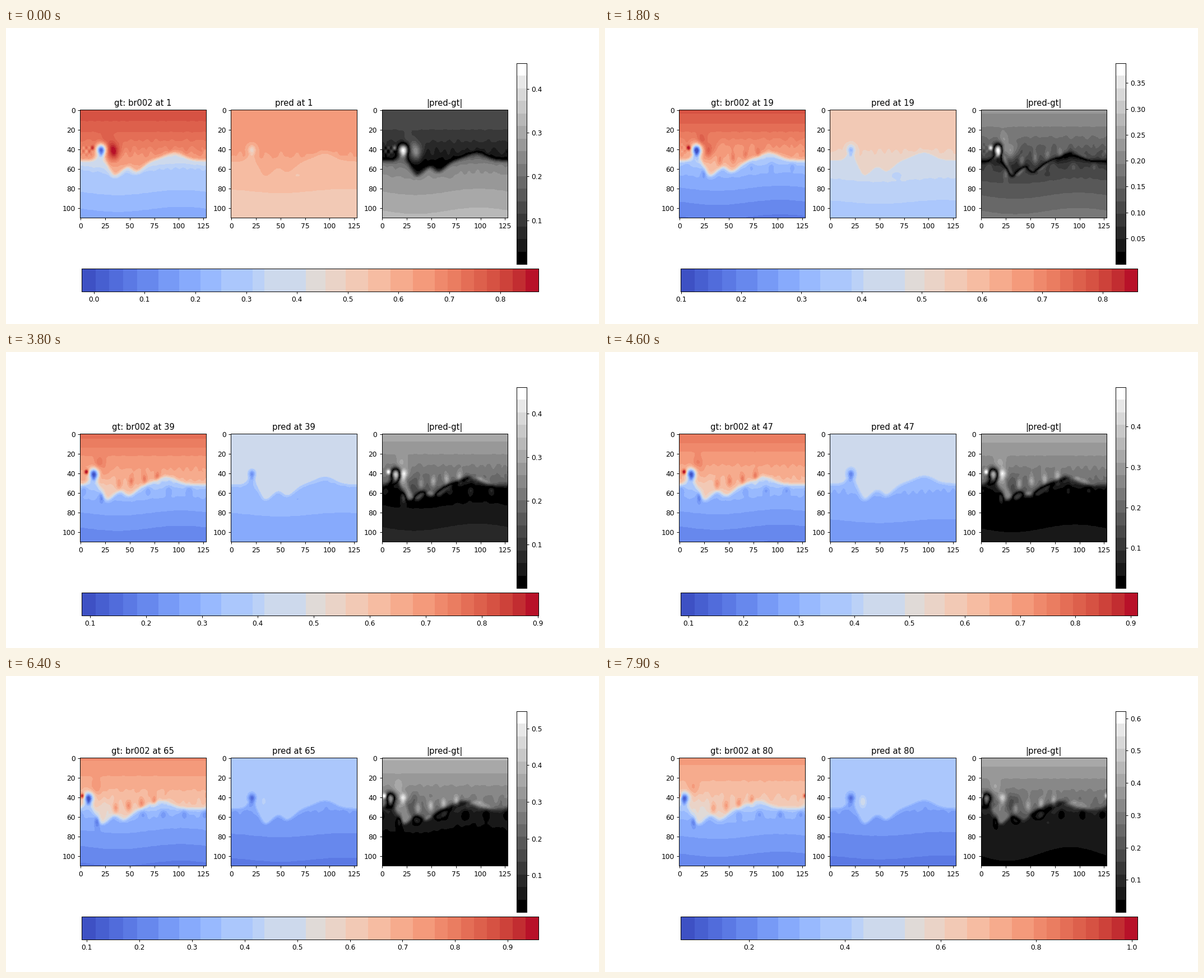
These frames come from a looping animation (1058 px wide and 529 px high, 8 s). A matplotlib script:

```python
import numpy as np
import matplotlib.pyplot as plt
from matplotlib.animation import FuncAnimation
from matplotlib.colors import ListedColormap

W, H, DPI = 1058, 529, 1058 / 12
NX, NY, FRAMES = 128, 110, 80
Y, X = np.mgrid[0:NY, 0:NX].astype(float)
rng = np.random.default_rng(4)

WAVES = [(rng.integers(5, 17), rng.uniform(.08, .3) * (-1) ** i,
          rng.uniform(0, 2 * np.pi)) for i in range(9)]


def gauss(d, s):
    return np.exp(-.5 * (d / s) ** 2)


def wrap(d):
    return (d + NX / 2) % NX - NX / 2


def bump(x, y, sx, sy):
    return gauss(wrap(X - x), sx) * gauss(Y - y, sy)


def ripple(u, n):
    return sum(np.sin(2 * np.pi * k * u / NX + q * Y + p + .02 * i * n)
               for i, (k, q, p) in enumerate(WAVES)) / 3


def front(x):
    """Height of the interface: two troughs, a crest and a small hump."""
    return (51.5 + 15 * gauss(wrap(x - 37), 6.5) + 11 * gauss(wrap(x - 58), 6.5)
            - 8 * gauss(wrap(x - 93), 10) - 8 * gauss(wrap(x - 19), 3.8))


def signed_distance(u):
    s = u + .18 * (Y - 56)
    slope = front(s + .5) - front(s - .5)
    return (Y - front(s)) / np.sqrt(1 + slope ** 2)


def blend(cold, warm, dist, width):
    return cold + (warm - cold) * .5 * (1 - np.tanh(dist / width))


def eddies(n):
    fade, grow = np.exp(-n / 25), 1 - np.exp(-n / 35)
    f = (-.54 - .13 * fade) * bump(21 - .2 * n, 40.5, 3.2, 3.8)
    f += (.15 + .25 * grow) * bump(12.5 - .165 * n, 38.5, 1.5, 1.8)
    f += .19 * fade * bump(33 - .17 * n, 42, 4.5, 6.5)
    f += (.03 + .05 * grow) * bump(25 - .14 * n, 30, 3.5, 5)
    f -= .07 * grow * bump(36 - .17 * n, 51, 8, 9)
    f -= .18 * grow * bump(28 - .17 * n, 64, 1.8, 4.2)
    for i in range(4):
        f += .17 * grow * bump(43 + 13 * i - .11 * n, 51 - 2.5 * i, 2, 4)
        f -= .09 * grow * bump(76 + 21 * i - .2 * n, 57, 2.4, 3.2)
    dots = np.cos(2 * np.pi * (X + .2 * n) / 6) * np.cos(2 * np.pi * (Y - 38) / 8)
    return f + .08 * fade * dots * bump(6 - .17 * n, 41, 5, 3.5)


def truth(n):
    u = X + .2 * n
    env = gauss(Y - 46, 11)
    noise = env * ripple(u, n)
    y = Y + 3 * noise
    early = .787 - .125 * (np.maximum(y, 0) / 48) ** 1.5
    late = .764 - .0029 * y
    warm = late + (early - late) * np.exp(-n / 35)
    y = np.maximum(y - 2.6 * np.cos(2 * np.pi * (X - 38) / NX), 48)
    cold = .32 - .0024 * (y - 55) + .06 * np.exp((50 - y) / 6)
    return blend(cold, warm, signed_distance(u), 2.1) + .02 * noise + eddies(n)


PRED_DIST = signed_distance(X)
PRED_NOISE = ripple(X, 0) * gauss(Y - 50, 11)


def predicted(n):
    late = (n / FRAMES) ** 4
    top = .648 - .0055 * n + .000022 * n * n
    low = .235 + .33 * np.exp(-n / 30)
    bottom = .09 + .425 * np.exp(-n / 43)
    y = Y + 3 * PRED_NOISE
    warm = top + (.04 * late - .02) * np.minimum(y, 50) / 45
    y = np.maximum(y - 2 * np.cos(2 * np.pi * (X - 50) / NX), 50)
    cold = low + (bottom - low) * (y - 55) / 54
    core = -.16 - .08 * (1 - np.exp(-n / 10))
    return (blend(cold, warm, PRED_DIST, 1.5) + core * bump(21, 40.5, 2.6, 3.2)
            + .09 * late * bump(33, 44, 3.6, 6) - .02 * bump(67, 66, 3, 2))


def limits(n):
    """Lowest and highest value of the colours, highest error."""
    keys = [0, 8, 30, 46, 64, 79]
    return (np.interp(n, keys, [-.024, .112, .084, .086, .090, .057]),
            np.interp(n, keys, [.875, .831, .890, .912, .958, 1.011]),
            np.interp(n, keys, [.458, .359, .422, .497, .546, .621]))


def banded(name, edges, stretch=False):
    mids = (edges[1:] + edges[:-1]) / 2
    if stretch:
        mids[0], mids[-1] = 0, 1
    t = (np.arange(1024) + .5) / 1024
    return ListedColormap(plt.get_cmap(name)(mids)[np.searchsorted(edges, t) - 1])


# bands are wide around the middle of the scale and narrow at both ends
HEAT = banded("coolwarm", np.interp(
    np.arange(26), [0, 4, 8, 9, 10, 11, 13, 17, 25],
    [0, .1215, .3055, .374, .399, .491, .578, .773, 1]))
GREY = banded("gray", np.linspace(0, 1, 17), stretch=True)

fig = plt.figure(figsize=(12, 6), dpi=DPI, facecolor="white")


def axes_at(x, y, w, h):
    return fig.add_axes([x / W, 1 - (y + h) / H, w / W, h / H])


def panel(i, cmap):
    ax = axes_at(132.25 + 269.14 * i, 146.3, 224.28, 192.74)
    im = ax.imshow(np.zeros((NY, NX)), cmap=cmap, aspect="auto")
    ax.set_xticks(range(0, 126, 25))
    ax.set_yticks(range(0, 101, 20))
    return im, ax.set_title("|pred-gt|")


(gt_im, gt_title), (pr_im, pr_title), (er_im, _) = [
    panel(i, cmap) for i, cmap in enumerate((HEAT, HEAT, GREY))]

RAMP = np.linspace(0, 1, 1024)[None]
STYLE = dict(aspect="auto", interpolation="nearest", origin="lower")
hbar = axes_at(134.9, 430.06, 814.7, 40.73)
hbar.set_yticks([])
h_im = hbar.imshow(RAMP, cmap=HEAT, **STYLE)
vbar = axes_at(911.2, 63.48, 17.92, 358.45)
vbar.set_xticks([])
vbar.yaxis.tick_right()
v_im = vbar.imshow(RAMP.T, cmap=GREY, **STYLE)


def draw(n):
    low, high, worst = limits(n)
    gt, pred = truth(n), predicted(n)
    for im, data in ((gt_im, gt), (pr_im, pred)):
        im.set_data(data)
        im.set_clim(low, high)
    er_im.set_data(np.abs(pred - gt))
    er_im.set_clim(0, worst)
    h_im.set_extent((low, high, 0, 1))
    v_im.set_extent((0, 1, 0, worst))
    hbar.set_xlim(low, high)
    vbar.set_ylim(1e-4, worst)
    gt_title.set_text(f"gt: br002 at {n + 1}")
    pr_title.set_text(f"pred at {n + 1}")
    return gt_im, pr_im, er_im


anim = FuncAnimation(fig, draw, frames=FRAMES, interval=100,
                     repeat=True, repeat_delay=0)
plt.show()
```
